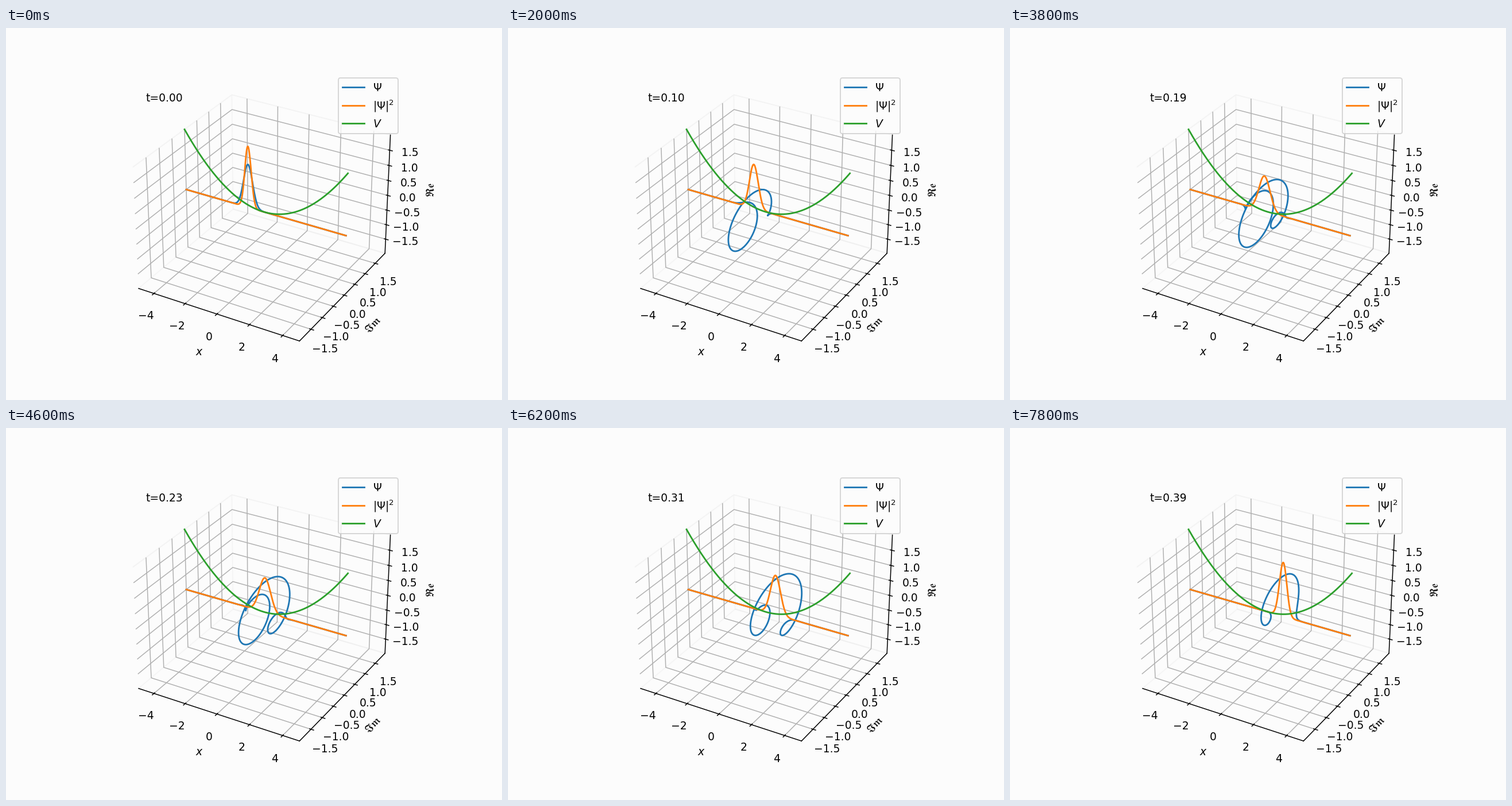
Animation, 864 px wide and 648 px high, one loop 8000 ms. Source, as a matplotlib script:

```python
import numpy as np
import matplotlib.pyplot as plt
from matplotlib.animation import FuncAnimation

BG = "#fcfcfc"
plt.rcParams.update({"figure.facecolor": BG, "axes.facecolor": BG,
                     "font.family": "DejaVu Sans", "font.size": 10})

FRAMES, INTERVAL, DT = 40, 200, 0.01

# Gaussian packet in a harmonic well, with hbar = m = 1
OMEGA = np.sqrt(50)
X0, SIGMA = -1.0, 0.2
A0 = 1 / (4 * SIGMA**2)
PEAK = 1 / (SIGMA * np.sqrt(2 * np.pi))
X_MAX = 5

x = np.linspace(-X_MAX, X_MAX, 1001)
zero = np.zeros_like(x)


def psi(t):
    """Exact squeezed-state wave function at time t."""
    c, s = np.cos(OMEGA * t), np.sin(OMEGA * t)
    center, momentum = X0 * c, -OMEGA * X0 * s
    spread = c + 2j * A0 / OMEGA * s
    a = (A0 * c + 0.5j * OMEGA * s) / spread
    d = x - center
    phase = momentum * d + momentum * center / 2
    return np.sqrt(PEAK) / np.sqrt(spread) * np.exp(-a * d**2 + 1j * phase)


fig = plt.figure(figsize=(6.4, 4.8), dpi=135)
ax = fig.add_subplot(projection="3d")

wave, = ax.plot(x, zero, zero, label=r"$\Psi$")
density, = ax.plot(x, zero, zero, label=r"$|\Psi|^2$")
ax.plot(x, zero, PEAK * (x / X_MAX)**2, label="$V$")

ax.set_xlim(-X_MAX, X_MAX)
ax.set_ylim(-PEAK, PEAK)
ax.set_zlim(-PEAK, PEAK)
ticks = np.arange(-1.5, 1.6, 0.5)
ax.set_xticks(range(-4, 5, 2))
ax.set_yticks(ticks)
ax.set_zticks(ticks)
ax.set_xlabel("$x$")
ax.set_ylabel(r"$\mathfrak{Im}$")
ax.set_zlabel(r"$\mathfrak{Re}$")
for axis in (ax.xaxis, ax.yaxis, ax.zaxis):
    axis.pane.set_facecolor(BG)
    axis.pane.set_edgecolor("0.92")
ax.legend(loc="upper right")
clock = ax.text2D(0.1, 0.9, "", transform=ax.transAxes)


def update(i):
    t = i * DT
    p = psi(t)
    wave.set_data_3d(x, p.imag, p.real)
    density.set_data_3d(x, zero, np.abs(p)**2)
    clock.set_text(f"t={t:.2f}")
    return wave, density, clock


anim = FuncAnimation(fig, update, frames=FRAMES, interval=INTERVAL,
                     init_func=lambda: update(0), repeat=True, repeat_delay=0)
plt.show()
```
